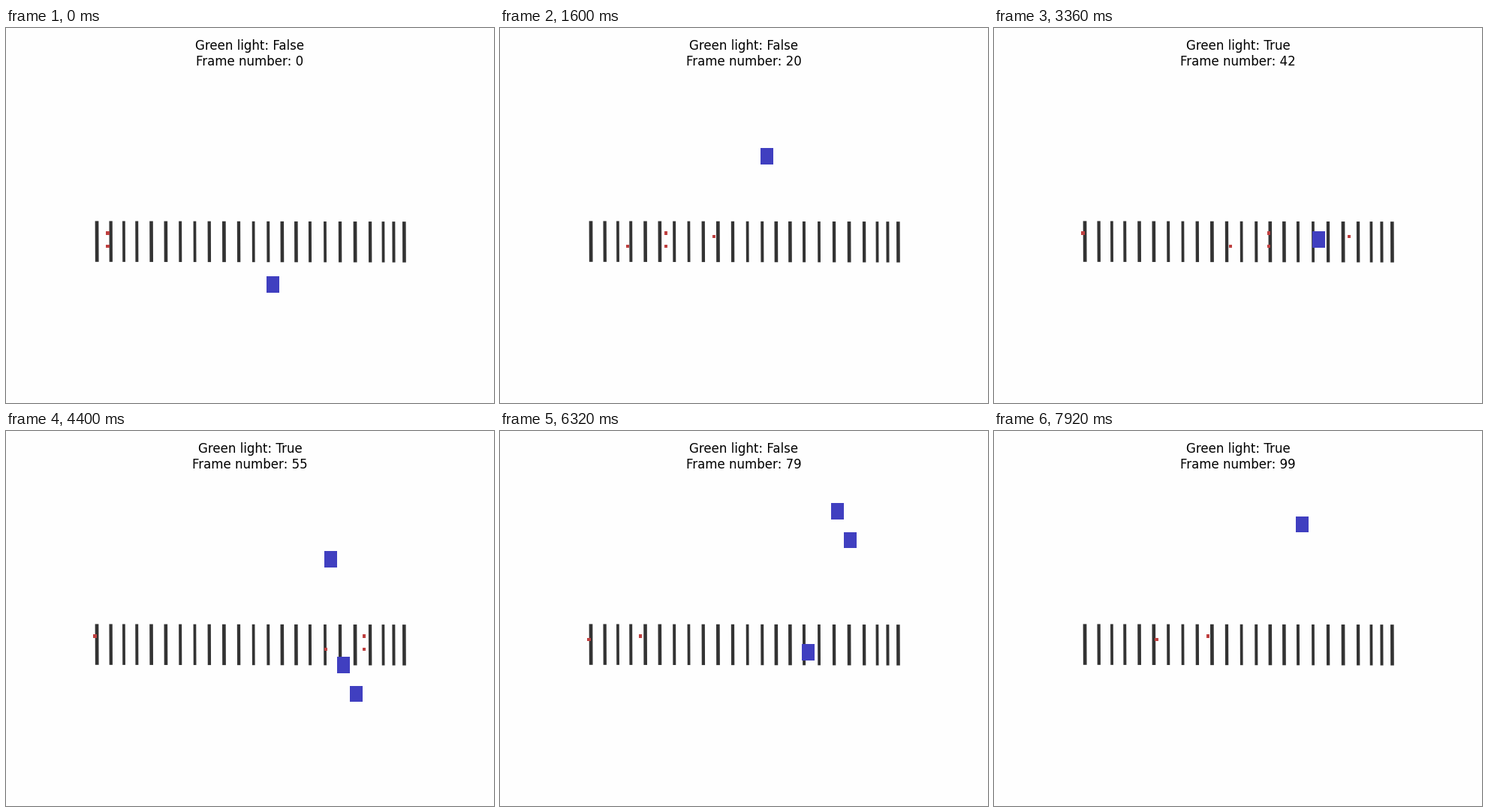
A matplotlib script that plays this animation: 650x500 px, repeating every 8 s.

```python
import math

import matplotlib.pyplot as plt
import numpy as np
from matplotlib.animation import FuncAnimation
from matplotlib.patches import Polygon, Rectangle

W, H, DPI = 650, 500, 100
FRAMES, INTERVAL = 100, 80
CELL, X0, Y0 = 4.268, 116.3, 331.2
CAR_W, CAR_H, CAR_STEP, ENTRY_ROW = 4, 5, 2, 3
LAST_COL, TOP_ROW = 98, -62
LIGHT_PERIOD, LIGHT_OFFSET = 33, 2
STRIPES = 23
PAPER, BAR, BLUE, RED = "#fefefe", "#333333", "#403fc0", "#bf4040"

# Column of each car and the time, in frames, at which it enters
CARS = {54: -1.5, 72: 33.5, 76: 50, 80: 54.5, 67: 72}
# Time each walker leaves the kerb, row, cells per frame
WALKERS = [(-4, -14, 1), (-4, -10, 1), (0.5, -13, 2),
           (8, -10, 1), (32, -14, 1), (79, -13, 1)]


def is_green(frame):
    return (frame + LIGHT_OFFSET) // LIGHT_PERIOD % 2 == 1


def cars_at(frame):
    cars = [(col, round(ENTRY_ROW - CAR_STEP * (frame - start)))
            for col, start in CARS.items() if frame >= start]
    return [(col, top) for col, top in cars if top >= TOP_ROW]


def blocked(col, row, cars):
    """A car blocks its own rows and those it has just left."""
    return any(left <= col < left + CAR_W
               and top <= row < top + CAR_H + CAR_STEP
               for left, top in cars)


def walk(start, row, speed):
    """Visible column of one walker for each frame."""
    first = max(0, math.ceil(start))
    col = round(speed * (first - start))
    path = {first: col}
    for frame in range(first + 1, FRAMES):
        green = is_green(frame)
        if green and col > 0:
            speed = 2
        if not (green and col == 0):
            cars = cars_at(frame)
            for _ in range(speed):
                if not blocked(col + 1, row, cars):
                    col += 1
        if col > LAST_COL:
            break
        path[frame] = col
    return path


PATHS = [(walker[1], walk(*walker)) for walker in WALKERS]

fig = plt.figure(figsize=(W / DPI, H / DPI), dpi=DPI, facecolor=PAPER)
ax = fig.add_axes([0, 0, 1, 1])
ax.set(xlim=(0, W), ylim=(H, 0))
ax.axis("off")

# Hand-drawn crossing: uneven spacing and stripe widths
centres = np.interp(range(STRIPES), [0, 1, 3, 8, 12, 15, 19, 20, 22],
                    [121, 139.6, 174.2, 270.7, 349.2, 404.9, 485, 502.4, 530.3])
for i, x in enumerate(centres):
    half = 2.1 + 0.25 * math.cos(2 * math.pi * i / 4.5)
    top = 257.4 + 0.8 * i / STRIPES
    left, right = x - half, x + half
    ax.add_patch(Polygon([(left, top), (right, top), (right + 0.2, top + 54.4),
                          (left + 0.2, top + 54.4)], fc=BAR, lw=0))


def make_blocks(count, color, z):
    return [ax.add_patch(Rectangle((0, 0), 0, 0, fc=color, lw=0, zorder=z,
                                   antialiased=False)) for _ in range(count)]


def place(block, col, row, cols, rows):
    left, right = (round(X0 + CELL * c) for c in (col, col + cols))
    top, bottom = (round(Y0 + CELL * r) for r in (row, row + rows))
    block.set_bounds(left, top, right - left, bottom - top)
    block.set_visible(True)


car_blocks = make_blocks(len(CARS), BLUE, 4)
walker_blocks = make_blocks(len(WALKERS), RED, 3)
title = ax.text(W / 2, 50, "", ha="center", va="baseline", fontsize=12,
                family="DejaVu Sans", color="black")


def update(frame):
    blocks = car_blocks + walker_blocks
    for block in blocks:
        block.set_visible(False)
    for block, (col, top) in zip(car_blocks, cars_at(frame)):
        place(block, col, top, CAR_W, CAR_H)
    for block, (row, path) in zip(walker_blocks, PATHS):
        if frame in path:
            place(block, path[frame], row, 1, 1)
    title.set_text(f"Green light: {is_green(frame)}\nFrame number: {frame}")
    return blocks + [title]


anim = FuncAnimation(fig, update, frames=FRAMES, interval=INTERVAL,
                     repeat=True, repeat_delay=0)
plt.show()
```
